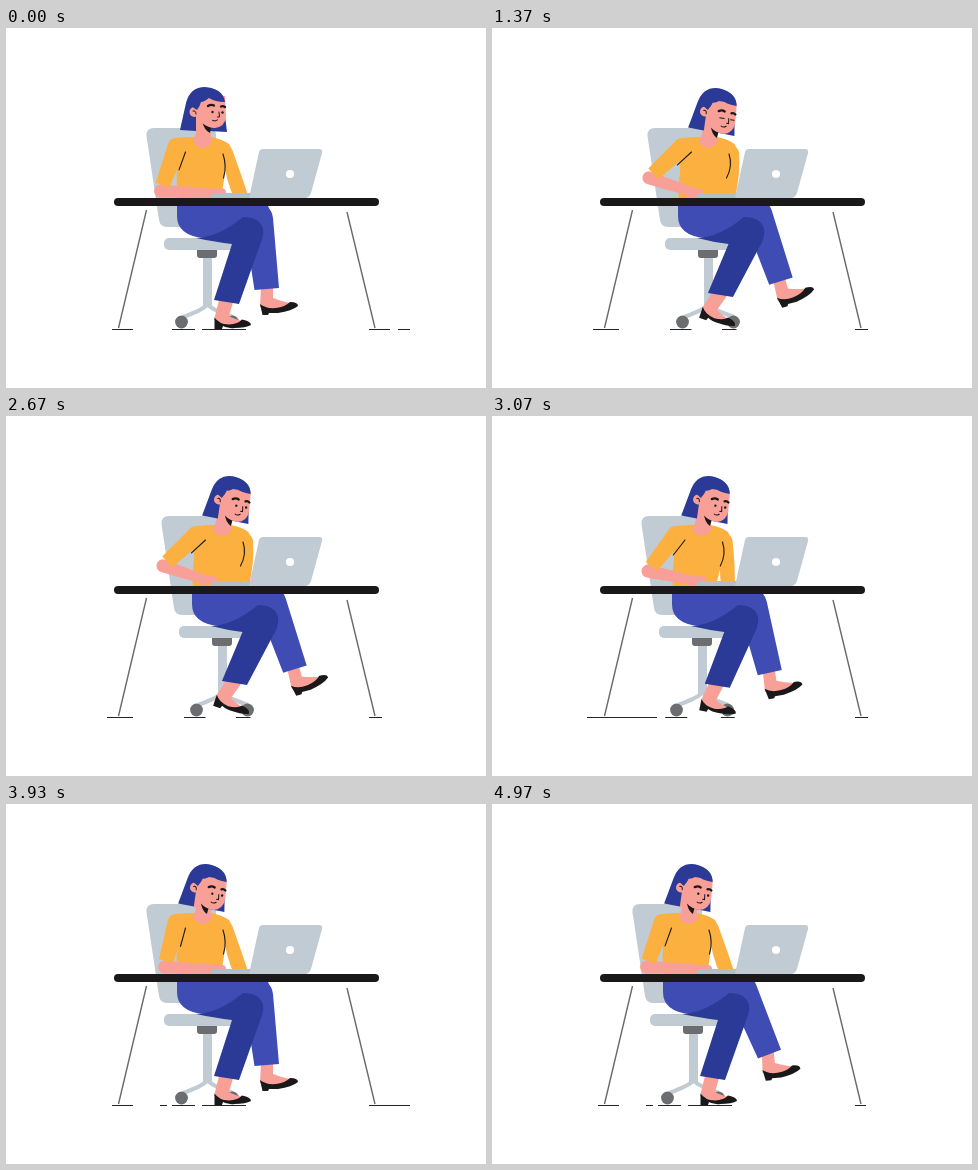
Recreate the animation shown at these times as an HTML page. Size 480x360 px, loop 5 s.

```html
<!DOCTYPE html>
<html lang="en">
<head>
<meta charset="utf-8">
<title>Desk work</title>
<style>
  html, body { margin: 0; width: 100%; height: 100%; overflow: hidden; background: #fff; }
  svg { display: block; width: 100vw; height: 100vh; }
  .gray { fill: #c1cbd3; }
  .steel { fill: #6c6d71; }
  .skin { fill: #f8a097; }
  .shirt { fill: #fbb040; }
  .pants { fill: #3f4cb4; }
  .navy { fill: #2a3a96; }
  .ink { fill: #1a1819; }
  .line { fill: none; stroke: #1a1819; stroke-linecap: round; }
</style>
</head>
<body>
<svg viewBox="0 0 480 360">
  <path id="floor" fill="none" stroke="#242424" stroke-width="1.1"/>

  <g id="chair">
    <path class="gray" d="M148 100H203Q210 100 210 107V199H161Q154 199 153 192L140.500 108Q140 100 148 100Z"/>
    <rect class="gray" x="158" y="210" width="80" height="12" rx="5"/>
    <rect class="gray" x="197" y="226" width="9" height="53"/>
    <path d="M201.500 276Q199 281 177 289M201.500 276Q204 281 227 289" fill="none" stroke="#c1cbd3" stroke-width="4"/>
    <path class="steel" d="M191 222H211V227Q211 230 208 230H194Q191 230 191 227Z"/>
    <circle class="steel" cx="175.500" cy="294" r="6.400"/>
    <circle class="steel" cx="226.500" cy="294" r="6.400"/>
  </g>

  <g id="backLeg">
    <g id="backFoot">
      <path class="skin" d="M255 258H267L267 270Q274 273 284 275L272 283L254 279Z"/>
      <path class="ink" d="M254 276Q260 281 270 280Q279 279 284 274Q292 274 292 278Q286 283 272 285L263 285L262 287H256.500Z"/>
    </g>
    <path class="pants" d="M235 178H259Q266 181 267 190L273 260L248.500 262L239 200Z"/>
  </g>
  <g id="frontFoot">
    <path class="skin" d="M214 268L228 271L223 288Q228 291 237 293L226 299L208 292Z"/>
    <path class="ink" d="M208.500 289.500Q213 296 223 296.500Q232 296 236 291.500Q245 293 245 297Q240 300 228 300Q221 300 217 298L216 301H208.500Z"/>
  </g>
  <path id="thigh" class="pants" d="M171 174H259Q265 180 265 190L250 205L230 214L197 210Q171 207 171 188Z"/>
  <path id="frontLeg" class="navy"/>

  <g id="torso">
    <path class="shirt" d="M164 112Q170 109 188 109H205Q216 111 223 116L227 124L218 134Q220 150 214 172H172Q170 160 171 142L166 120Z"/>
    <path class="skin" d="M190 90H204L205 109Q206 112 206 114Q202 120 196 120Q190 119 187 113Q190 108 190 100Z"/>
  </g>
  <path id="rightSleeve" class="shirt"/>
  <path id="rightFold" class="line" stroke-width="1.100"/>
  <path id="forearm" class="skin"/>
  <path id="hand" class="skin"/>
  <path id="leftSleeve" class="shirt"/>
  <path id="leftFold" class="line" stroke-width="1.100"/>

  <g id="head">
    <path class="navy" d="M174 102L180 75Q184 59 199 59Q215 60 218 73L219 88L221 104L203 103L196 97L190 103Z"/>
    <path class="skin" d="M190 104V80H204V100Z"/>
    <g id="face">
      <path class="ink" d="M196 93Q198 102 204 105L205 97Z"/>
      <path class="skin" d="M191 90V68H219L220 88Q219 99 209 100Q202 100 196 95Z"/>
      <path class="line" stroke-width="2.300" d="M202 78Q205 76 208 77.500M215 78.500Q217 77.500 219 79"/>
      <path class="line" stroke-width="1" d="M213 84L213.500 89H211.500M206.500 92.500Q209 94 211.500 92"/>
      <g id="eyesOpen" class="ink">
        <circle cx="206.500" cy="84" r="1.200"/>
        <circle cx="216.500" cy="84.500" r="1.200"/>
      </g>
      <path id="eyesShut" class="line" stroke-width="1" d="M204 84.500H208.500M215 85H218.500"/>
    </g>
    <circle class="skin" cx="188.500" cy="84" r="5"/>
    <path class="navy" d="M191 82Q194 78 195 74Q198 74 203 70Q209 74 219 74Q217 60 199 60Q186 60 182 76L188 80Z"/>
    <path class="line" stroke-width="1" d="M187 83Q190 82 190 86"/>
  </g>

  <path d="M140.500 182L112.500 300M341 184L369 300" fill="none" stroke="#6a6a6a" stroke-width="1.400"/>
  <path d="M204 170L206 165H250V170Z" fill="#b4bec6"/>
  <path class="gray" d="M257 121H313Q317 121 316 125L305 165Q303 170 299 170H243L253 124Q254 121 257 121Z"/>
  <circle cx="284" cy="146" r="4" fill="#fff"/>
  <rect class="ink" x="108" y="170" width="265" height="8" rx="4"/>
</svg>
<script>
const LOOP = 5000;
const el = {};
document.querySelectorAll('[id]').forEach(n => el[n.id] = n);

const move = (name, value) => el[name].setAttribute('transform', value);
const draw = (name, d) => el[name].setAttribute('d', d);

// Eased 0 to 1 between two times
function ramp(t, from, to) {
  const u = Math.min(1, Math.max(0, (t - from) / (to - from)));
  return u * u * (3 - 2 * u);
}

// Tapered limb: round start, flat end
function taper(x1, y1, r1, x2, y2, r2) {
  const len = Math.hypot(x2 - x1, y2 - y1);
  const nx = (y1 - y2) / len, ny = (x2 - x1) / len;
  return `M${x1 - nx * r1} ${y1 - ny * r1}L${x2 - nx * r2} ${y2 - ny * r2}
    L${x2 + nx * r2} ${y2 + ny * r2}L${x1 + nx * r1} ${y1 + ny * r1}
    A${r1} ${r1} 0 0 1 ${x1 - nx * r1} ${y1 - ny * r1}Z`;
}

function drawLegs(s, kick) {
  const turn = .83 * s + 16 * kick;
  move('thigh', `translate(${s})`);
  move('backLeg', `translate(${s - .24 * turn} ${-.34 * turn}) rotate(${-turn} 252 185)`);
  move('backFoot', `translate(${-.12 * turn}) rotate(${11 * kick - .2 * s} 262 262)`);
  move('frontFoot', `translate(${-.15 * s}) rotate(${1.25 * s} 243 298)`);
  const x = .53 * s, y = -.47 * s, inner = 226 + .7 * s;
  draw('frontLeg', `M${190 + s} 210Q${213 + s} 209 ${237 + s} 189Q${254 + s} 189 ${257 + s} 201
    Q${258 + s} 207 ${255 + s} 214L${233 + x} ${276 + y}L${208 + x} ${272 + y}L${inner} 216
    Q${inner - 16} 214 ${190 + s} 210Z`);
}

function drawArms(t, s, lean, kick) {
  const d = s + lean;
  const ex = 154.5 + .16 * s + 4 * (ramp(t, 3500, 3900) - kick), ey = 163 - .88 * s;
  const sx = 170.5 + d, sy = 119;
  const dx = ex - sx, dy = ey - sy, len = Math.hypot(dx, dy);
  const tip = 220 - .6 * s, tap = Math.sin(t / 55) * .6;
  draw('forearm', taper(ex, ey, 6.5, 203, 165, 4.5));
  draw('hand', taper(tip - 4, 164.5 + tap, 4, 196, 165, 4.5));
  draw('leftSleeve', taper(sx, sy, 9, sx + dx * .87, sy + dy * .87, 7.3));
  draw('leftFold', `M${sx + 9} ${sy + 5}l${dx / len * 19} ${dy / len * 19}`);
  draw('rightSleeve', `M${212 + d} 112Q${225 + d} 117 ${227 + d} 124Q${235 + .9 * s} 146 243 170
    H${228 + .15 * s}Q${220 + .7 * s} 152 ${216 + d} 126Z`);
  draw('rightFold', `M${217 + d} 126Q${221 + d} 138 ${217.5 + s + lean * .4} 150`);
}

function drawFloor(t, s) {
  const sweep = ramp(t, 2880, 3050) - ramp(t, 3080, 3420);
  const grow = ramp(t, 3070, 3400);
  const right = 384 - 8 * ramp(t, 400, 1400) + 28 * grow - 30 * ramp(t, 4000, 4700);
  const dashes = [
    [106 - 5 * ramp(t, 230, 600) - 6 * sweep + 5 * grow, 127 + 38 * sweep],
    [154, 154 + 7 * grow],
    [166 + .8 * s, 189 + .7 * s],
    [196 + Math.min(31, 4.2 * s) + .2 * s, 240 + .3 * s],
    [363, right],
    [392 + 12 * ramp(t, 230, 600), 404]
  ];
  draw('floor', dashes.map(([a, b]) => `M${a} 301.500H${b}`).join(''));
}

function render(t) {
  const s = 15 * (ramp(t, 230, 1110) - ramp(t, 2690, 3570));
  const lean = 5 * (ramp(t, 600, 1200) - ramp(t, 2950, 3570));
  const tilt = 8 * ramp(t, 550, 1250);
  const kick = ramp(t, 4050, 4950);
  const shut = t > 1270 && t < 1470;
  const skew = lean / 60;
  move('chair', `translate(${s})`);
  move('torso', `matrix(1 0 ${-skew} 1 ${s + skew * 170} 0)`);
  move('head', `translate(${s + 1.8 * lean + .12 * tilt} ${.12 * tilt}) rotate(${tilt} 198 80)`);
  move('face', `translate(0 ${.45 * tilt})`);
  el.eyesOpen.style.display = shut ? 'none' : '';
  el.eyesShut.style.display = shut ? '' : 'none';
  drawLegs(s, kick);
  drawArms(t, s, lean, kick);
  drawFloor(t, s);
}

const start = performance.now();
function tick() {
  render((performance.now() - start) % LOOP);
  requestAnimationFrame(tick);
}
tick();
</script>
</body>
</html>
```
